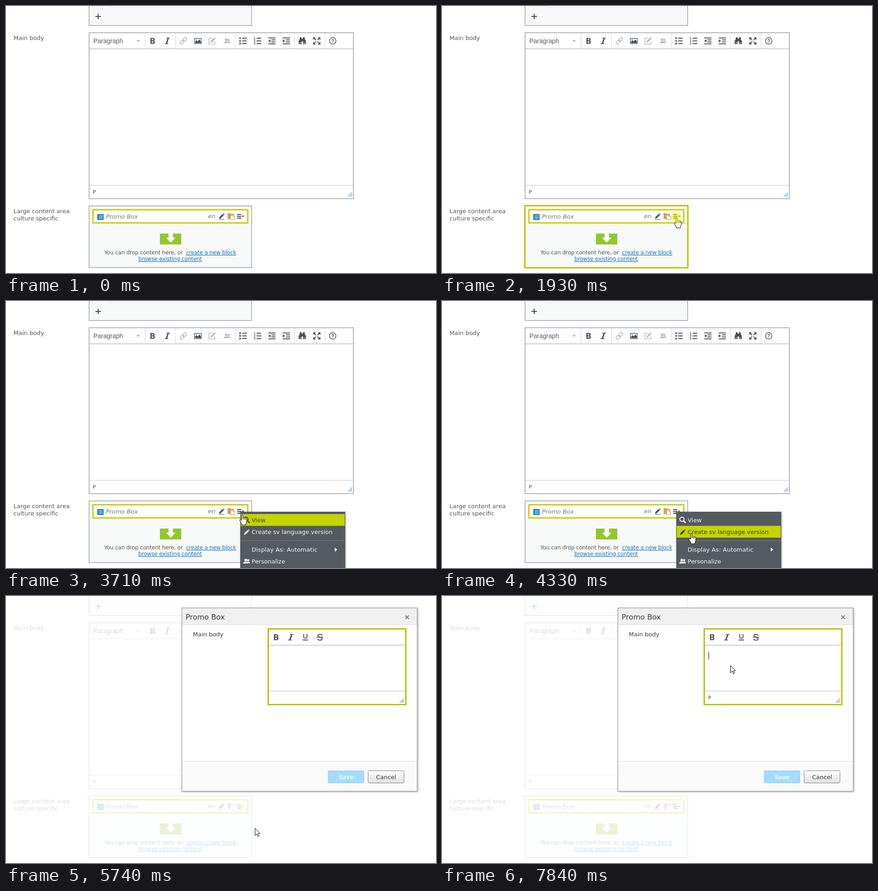
These frames come from a looping animation (947x589 px, 8 s). An HTML page:

```html
<!DOCTYPE html>
<html lang="en">
<head>
<meta charset="utf-8">
<title>Content block editor</title>
<style>
html, body { margin: 0; width: 100%; height: 100%; overflow: hidden; background: #fff; }
svg { display: block; }
text { font: 13px "DejaVu Sans", sans-serif; white-space: pre; }
.label { fill: #555; }
.small { font-size: 12px; letter-spacing: -.17px; fill: #555; }
.link { fill: #1b75bb; text-decoration: underline; }
.tag { font-size: 11px; fill: #444; }
.oblique { font-style: oblique; fill: #777; }
.frame { stroke: #b3b6c1; stroke-width: 2; }
.line { fill: none; stroke: currentColor; }
.crisp { shape-rendering: crispEdges; }

/* One loop is 8 s, so 1% is 80 ms. */
.show { opacity: 0; animation: 8s step-end infinite; }
#tip { animation-name: tip; }
#focus { animation-name: focus; }
#menu { animation-name: menu; }
#hotView { animation-name: hotView; }
#hotCreate { animation-name: hotCreate; }
#arrow { animation-name: arrow; }
#hand { animation-name: hand; }
#click { animation-name: click; }
#caret { animation-name: caret; }
#path { animation-name: caretPath; }
#veil { opacity: 0; animation: veil 8s steps(4, end) infinite; }
#dialog { opacity: 0; animation: dialog 8s steps(4, end) infinite; }
#pointer { animation: move 8s step-end infinite; }

@keyframes tip { 0%, 24.125% { opacity: 0 } 21.25% { opacity: 1 } }
@keyframes focus { 0%, 27% { opacity: 0 } 24.125% { opacity: 1 } }
@keyframes menu { 0%, 67.875% { opacity: 0 } 27% { opacity: 1 } }
@keyframes hotView { 0%, 51.25% { opacity: 0 } 27% { opacity: 1 } }
@keyframes hotCreate { 0%, 67.875% { opacity: 0 } 51.25% { opacity: 1 } }
@keyframes arrow {
  0%, 15.3%, 45.5%, 100% { opacity: 0 }
  3.75%, 27%, 67.875% { opacity: 1 }
}
@keyframes hand {
  0%, 27%, 67.875% { opacity: 0 }
  15.3%, 45.5% { opacity: 1 }
}
@keyframes click {
  0%, 27%, 67.875%, 98% { opacity: 0 }
  24.125%, 64.75%, 97% { opacity: 1 }
}
@keyframes caret { 0% { opacity: 0 } 97% { opacity: 1 } }
@keyframes caretPath { 0% { opacity: 0 } 98% { opacity: 1 } }
@keyframes veil { 0%, 67.875% { opacity: 0 } 71.72%, 100% { opacity: .8 } }
@keyframes dialog { 0%, 67.875% { opacity: 0 } 71.72%, 100% { opacity: 1 } }
@keyframes move {
  0% { transform: translate(830px, 576px) }
  3.75% { transform: translate(830px, 576px); animation-timing-function: steps(5, end) }
  8.56% { transform: translate(636px, 499px); animation-timing-function: steps(5, end) }
  13.37% { transform: translate(531px, 469px) }
  14.37% { transform: translate(526px, 468px) }
  15.3% { transform: translate(519px, 467px) }
  16.24% { transform: translate(516px, 466px) }
  44.53% { transform: translate(516px, 466px); animation-timing-function: steps(5, end) }
  49.32% { transform: translate(532px, 488px); animation-timing-function: steps(5, end) }
  54.11% { transform: translate(548px, 512px) }
  78.66% { transform: translate(548px, 512px); animation-timing-function: steps(3, end) }
  81.54% { transform: translate(558px, 470px); animation-timing-function: steps(5, end) }
  86.36% { transform: translate(622px, 205px); animation-timing-function: steps(3, end) }
  89.24% { transform: translate(634px, 154px) }
  90.12%, 100% { transform: translate(635px, 153px) }
}
</style>
</head>
<body>
<svg width="947" height="589" xmlns="http://www.w3.org/2000/svg">
<defs>
  <path id="bold" fill="currentColor" fill-rule="evenodd" d="M-5-6.500h5c3 0 4.600 1.400 4.600 3.400 0 1.400-.8 2.300-1.900 2.800C4.200.1 5 1.300 5 3c0 2.300-1.800 3.500-4.800 3.500H-5zM-2.200-4.200v3h2c1.200 0 1.900-.6 1.900-1.500S1-4.200-.2-4.200zM-2.200 1v3.200H0c1.400 0 2.100-.6 2.100-1.600S1.400 1 0 1z"/>
  <path id="italic" fill="currentColor" d="M-2-7H6v1.500H3.600L0 5.500H2.500V7h-8V5.500h2.300L.6-5.500H-2z"/>
  <path id="grip" class="line crisp" d="M0 .5h-2M0 2.500h-4M0 4.500h-6M0 6.500h-8M0 8.500h-10"/>
  <path id="bars" class="line" stroke-width="2" d="M-8-6.500H8M-1-2.200H8M-1 2.200H8M-8 6.500H8"/>
  <path id="pencil" fill="currentColor" d="M-6 6l1.200-4L2-4.800 4.800-2-2 4.800zM2.800-5.600L4-6.600 6.400-4 5.500-2.800z"/>
  <g id="people" fill="currentColor">
    <circle cx="3.500" cy="-2" r="2.400"/>
    <path d="M1 4.500V2q2.500-2 6 .5v2z"/>
    <circle cx="-2" cy="-2.500" r="3"/>
    <path d="M-7.500 5V3.500Q-6 1-2 1t5 2.500V5z"/>
  </g>
  <g id="view">
    <circle class="line" cx="528.500" cy="481.500" r="4.700" stroke-width="2"/>
    <path class="line" stroke-width="2.600" d="M532 485l4.500 4.500"/>
    <text x="541" y="488" fill="currentColor">View</text>
  </g>
  <g id="create">
    <use href="#pencil" x="530" y="510"/>
    <text x="541" y="514" fill="currentColor">Create sv language version</text>
  </g>
  <linearGradient id="button" x2="0" y2="1">
    <stop stop-color="#fdfdfd"/><stop offset="1" stop-color="#dfe0e1"/>
  </linearGradient>
  <filter id="shadow" x="-10%" y="-10%" width="120%" height="120%">
    <feDropShadow dx="1" dy="1" stdDeviation="2" flood-opacity=".4"/>
  </filter>
</defs>

<!-- Preceding field -->
<rect class="frame" x="183" y="-9" width="358" height="52" fill="#f7f9f9"/>
<rect class="crisp" x="230.500" y="-5.500" width="304" height="9" fill="#fff" stroke="#dfe1e3"/>
<path d="M203 17v12M197 23h12" stroke="#444" stroke-width="2"/>

<!-- Main editor -->
<text class="label" x="16.500" y="75">Main body</text>
<rect class="frame" x="183" y="59" width="582" height="366" fill="#fff"/>
<path class="crisp" d="M184 94.500h580" stroke="#a3a4a8"/>
<path class="crisp" d="M184 395.500h580" stroke="#c3c4c8"/>
<path class="crisp" d="M306.500 60v34M373.500 60v34M504.500 60v34M635.500 60v34M702.500 60v34" stroke="#d6d7da"/>
<text x="192.500" y="82" fill="#595959" style="font:14px 'Liberation Sans',sans-serif">Paragraph</text>
<path d="M287 75h8l-4 4.500z" fill="#b5b5b5"/>
<g color="#505050">
  <use href="#bold" x="323" y="77"/>
  <use href="#italic" x="355" y="77"/>
  <g color="#bdbdbd">
    <g class="line" stroke-width="1.700" transform="translate(390.500 77) rotate(-45)">
      <rect x="-9" y="-3" width="10" height="6" rx="3"/>
      <rect x="-1" y="-3" width="10" height="6" rx="3"/>
    </g>
    <path class="line" stroke-width="1.600" d="M455 71h-8v13h13v-6"/>
    <use href="#pencil" x="456" y="75"/>
    <use href="#people" x="487" y="77"/>
  </g>
  <rect x="415" y="71.500" width="15" height="11.500" fill="#fff" stroke="#4f5358" stroke-width="1.400"/>
  <path d="M416.500 81.500v-3l3-3 3 3 3-5 3.500 5v3z" fill="#38485c"/>
  <circle cx="419" cy="74.300" r="1" fill="#4f5358"/>
  <g fill="currentColor"><circle cx="515.500" cy="71" r="2"/><circle cx="515.500" cy="77" r="2"/><circle cx="515.500" cy="83" r="2"/></g>
  <path class="line" stroke-width="2" d="M520 71h10M520 77h10M520 83h10M552 71h10M552 77h10M552 83h10"/>
  <g fill="currentColor" style="font:bold 7px 'Liberation Sans',sans-serif">
    <text x="545.500" y="73" style="font:inherit">1</text><text x="545.500" y="79" style="font:inherit">2</text><text x="545.500" y="85" style="font:inherit">3</text>
  </g>
  <use href="#bars" x="585.500" y="77"/><path fill="currentColor" d="M582.500 73.500v7l-5-3.500z"/>
  <use href="#bars" x="617.500" y="77"/><path fill="currentColor" d="M609.500 73.500v7l5-3.500z"/>
  <path fill="currentColor" d="M647 69h4v3h3v-3h4v4l2.500 4v7H654v-6h-3v6h-6.500v-7l2.500-4z"/>
  <path d="M646 81.500h4M655 81.500h4" stroke="#fff"/>
  <path fill="currentColor" d="M676.500 69h6l-6 6zM692.500 69v6l-6-6zM676.500 85v-6l6 6zM692.500 85h-6l6-6z"/>
  <path class="line" stroke-width="2" d="M678 70.500l5 5M691 70.500l-5 5M678 83.500l5-5M691 83.500l-5-5"/>
  <circle class="line" cx="719.500" cy="77" r="7.200" stroke-width="1.500"/>
  <text x="719.500" y="81" text-anchor="middle" fill="currentColor" style="font:bold 11px 'Liberation Sans',sans-serif">?</text>
</g>
<text class="tag" x="191" y="414">P</text>
<use href="#grip" x="762" y="411" color="#6aaed6"/>

<!-- Content area -->
<text class="label" x="16.500" y="457">Large content area</text>
<text class="label" x="16.500" y="473">culture specific</text>
<rect class="frame" x="183" y="441" width="358" height="136" fill="#f7f9f9"/>
<rect id="focus" class="show" x="182.500" y="440.500" width="359" height="137" fill="none" stroke="#b5c400" stroke-width="3"/>
<rect x="191.500" y="449.500" width="341" height="29" fill="#fdfdfd" stroke="#c8d00a" stroke-width="3"/>
<rect x="201" y="459" width="14" height="13" fill="#1d7cc4"/>
<path class="crisp" d="M203.500 462.500h9M203.500 465.500h9M203.500 468.500h9" stroke="#fff"/>
<text class="oblique" x="220" y="469">Promo Box</text>
<text class="oblique" x="445" y="468">en</text>
<use href="#pencil" x="475" y="463.500" color="#4d4f6c"/>
<path d="M469 470.500h12" stroke="#4d4f6c"/>
<path d="M488 457h6l1 1.500h7V470h-14z" fill="#d9a24e"/>
<path d="M494.500 461.500h6l3 3v7h-9z" fill="#fff" stroke="#a9977e"/>
<path d="M500.500 461.500v3h3" fill="none" stroke="#a9977e"/>
<path d="M509 460h9M509 464h9M509 468h9" stroke="#444" stroke-width="2"/>
<path d="M519 462.500h5.500l-2.750 3.500z" fill="#444"/>
<rect x="339" y="502" width="47" height="24" fill="#94c62e"/>
<path d="M358 502h9.500v9h5.500l-10.250 11-10.250-11h5.500z" fill="#fff"/>
<text class="small" x="216.500" y="548">You can drop content here, or</text>
<text class="small link" x="396.500" y="548">create a new block</text>
<text class="small link" x="291.500" y="562">browse existing content</text>

<g id="tip" class="show">
  <rect x="526.500" y="481.500" width="82" height="19" fill="#fff" stroke="#767676" filter="url(#shadow)"/>
  <text x="531" y="495" fill="#575757" style="font:11.500px 'Open Sans',sans-serif">Display menu</text>
</g>

<!-- Context menu -->
<g id="menu" class="show" color="#f6f6f6">
  <rect x="516.500" y="465.500" width="230" height="140" fill="#555a60" stroke="#474c52" filter="url(#shadow)"/>
  <use href="#view"/>
  <use href="#create"/>
  <path class="crisp" d="M517 528.500h229" stroke="#74787d"/>
  <text x="541" y="553" fill="currentColor" letter-spacing=".1">Display As: Automatic</text>
  <path d="M724 544v9l5.500-4.500z" fill="#fff"/>
  <use href="#people" x="530" y="574"/>
  <text x="541" y="579" fill="currentColor">Personalize</text>
  <g id="hotView" class="show" color="#3d4218">
    <rect x="517" y="470" width="229" height="26" fill="#c3d400"/>
    <use href="#view"/>
  </g>
  <g id="hotCreate" class="show" color="#3d4218">
    <rect x="517" y="496" width="229" height="26" fill="#c3d400"/>
    <use href="#create"/>
  </g>
</g>

<rect id="veil" width="947" height="589" fill="#fff"/>

<!-- Dialog -->
<g id="dialog">
  <rect x="387.500" y="26.500" width="518" height="404" fill="#fff" stroke="#929292" filter="url(#shadow)"/>
  <rect x="388" y="27" width="517" height="36" fill="#f0f0f0"/>
  <rect x="388" y="365" width="517" height="65" fill="#fafafa"/>
  <path class="crisp" d="M388 63.500h517M388 364.500h517" stroke="#e0e0e0"/>
  <text x="395.500" y="52" fill="#3b3b3b" style="font-size:16px" letter-spacing=".1">Promo Box</text>
  <path d="M879.500 43l7.500 7.500M887 43l-7.500 7.500" stroke="#777" stroke-width="2"/>
  <text x="411.500" y="89" fill="#3b3b3b">Main body</text>
  <rect x="577.500" y="72.500" width="303" height="167" fill="#fff" stroke="#b5c400" stroke-width="3"/>
  <path class="crisp" d="M579 108.500h300" stroke="#a3a4a8"/>
  <path class="crisp" d="M579 209.500h300" stroke="#b9babd"/>
  <g color="#505050">
    <use href="#bold" x="595" y="91"/>
    <use href="#italic" x="627" y="91"/>
    <path class="line" stroke-width="2" d="M655.500 84v5.500a3.750 3.750 0 0 0 7.500 0V84M653.500 97h11.500"/>
    <path class="line" stroke-width="2" d="M696 87.500q-.5-3-4.500-3-4.500 0-4.500 3 0 2.300 4.500 3.300 4.700 1 4.700 3.500 0 3.200-4.700 3.200-4.500 0-5-3.200"/>
    <path class="line" stroke-width="1.500" d="M684 91h15"/>
  </g>
  <use href="#grip" x="876" y="226" color="#999"/>
  <path id="caret" class="show crisp" d="M587.500 123v17" stroke="#000"/>
  <text id="path" class="tag show" x="586" y="228">P</text>
  <rect x="709.500" y="385.500" width="79" height="27" rx="2" fill="#a5dcfb" stroke="#99d3f4"/>
  <text x="749" y="404" text-anchor="middle" fill="#fff" stroke="#fff" stroke-width=".3">Save</text>
  <rect x="797.500" y="385.500" width="79" height="27" rx="2" fill="url(#button)" stroke="#7b7f84"/>
  <text x="837" y="404" text-anchor="middle" fill="#3b3b3b">Cancel</text>
</g>

<!-- Pointer -->
<g id="pointer">
  <path id="arrow" class="show" d="M.5.5v15.800l3.600-3.400 2.600 5.600 2.300-1-2.500-5.500h5z" fill="#fff" stroke="#000"/>
  <g id="hand" class="show">
    <g transform="translate(1 .5)" stroke="#000" fill="#fff" stroke-linejoin="round">
      <path d="M-1.500 13V1.700C-1.500 0 1.500 0 1.500 1.700V7c.6-1 2.800-.8 3 .6.700-.9 2.700-.6 2.900.8.900-.7 2.600-.2 2.600 1.300v5c0 2.500-1.500 4-2 6.800V23H-1v-1.500C-1.800 19-4 16-5 13.500c-.8-1.800 1.500-2.800 2.500-1.500z"/>
      <path d="M1.500 7v4M4.500 8v3.500M7.400 9v3" fill="none"/>
    </g>
  </g>
  <circle id="click" class="show" r="12" fill="#ff0" fill-opacity=".47"/>
</g>
</svg>
</body>
</html>
```
